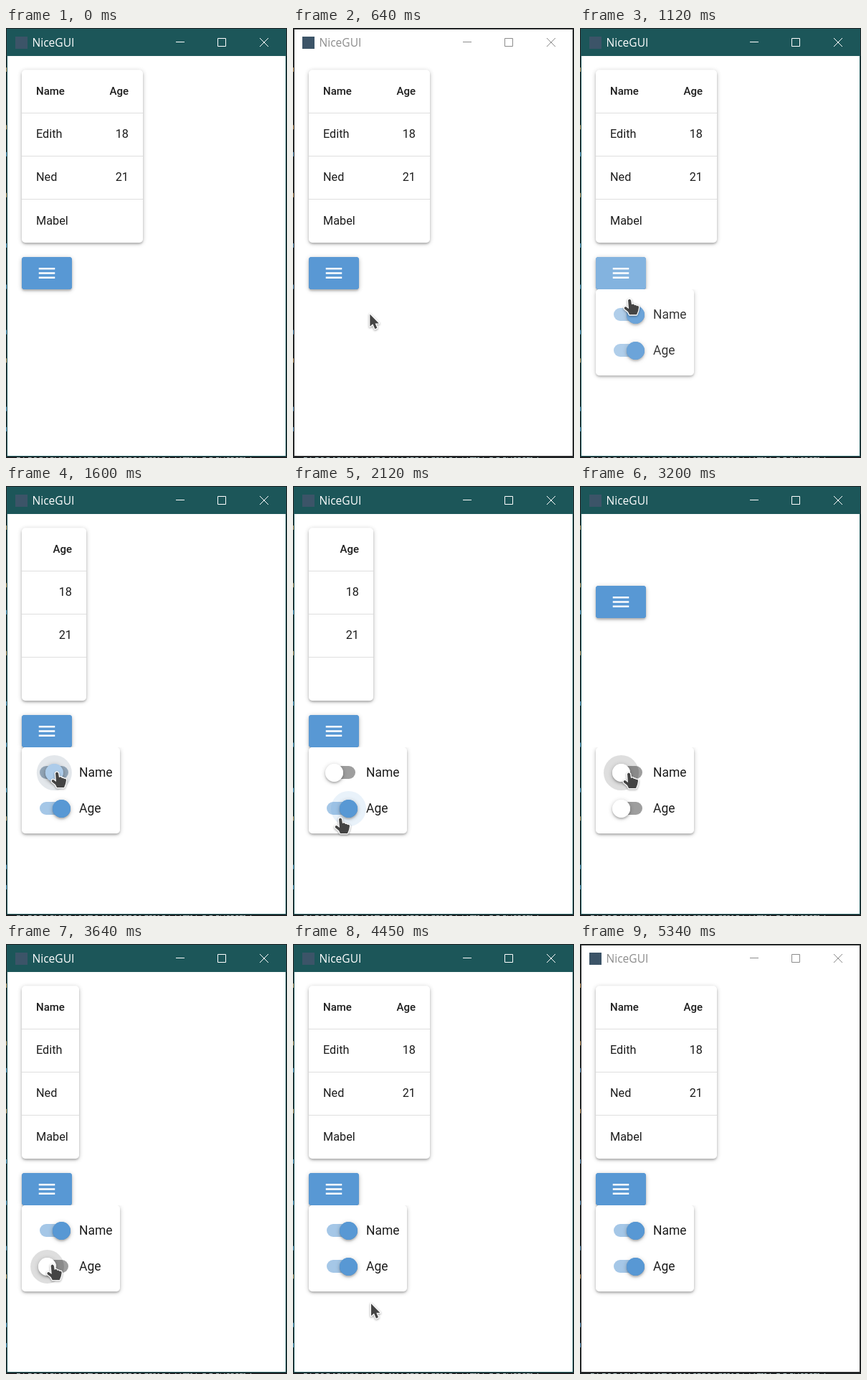
Recreate the animation shown at these times as an HTML page with a canvas. Size 392 by 599 pixels, loop 5420 ms.

```html
<!DOCTYPE html>
<html lang="en">
<head>
<meta charset="utf-8">
<title>Table columns</title>
<style>
  html, body { margin: 0; width: 100%; height: 100%; overflow: hidden; background: #fff; }
  canvas { display: block; }
</style>
</head>
<body>
<canvas id="stage" width="392" height="599"></canvas>
<script>
const ctx = document.getElementById('stage').getContext('2d');
const LOOP = 5420;
const INK = '#1d1d1d', BLUE = [88, 152, 212];
const REPLY = 60; // delay between a toggle and the table update
const rows = [['Name', 'Age'], ['Edith', '18'], ['Ned', '21'], ['Mabel', '']];

// Each move eases the pointer to a place between two times.
const pointerStart = { x: 262, y: 600 };
const moves = [
  { from: 120, to: 860, x: 66, y: 345 },
  { from: 880, to: 1300, x: 71, y: 398 },
  { from: 1880, to: 2120, x: 66, y: 462 },
  { from: 2400, to: 2720, x: 65, y: 443 },
  { from: 2760, to: 3000, x: 68, y: 399 },
  { from: 3480, to: 3700, x: 64, y: 456 },
  { from: 4240, to: 4450, x: 109, y: 501 },
  { from: 4450, to: 4770, x: 334, y: 600 }
];
const toggles = [
  { label: 'Name', y: 399, off: 1500, on: 3220, hovers: [[1240, 1900], [2900, 3440]] },
  { label: 'Age', y: 449, off: 2560, on: 4130, hovers: [[1940, 2800], [3510, 4250]] }
];

const handShape = new Path2D('M-2 2Q0-1 2 2L3 8Q6 6 7 9Q9 8 10 10Q13 9 13 12L12 17L10 22H0L-2 18L-7 14Q-8 11-5 11L-1 14Z');
const arrowShape = new Path2D('M0 0V17L4 13.5L7 20.5L10 19L7.3 12.7H12.5Z');

function ease(t, start, duration) {
  const k = Math.min(1, Math.max(0, (t - start) / duration));
  return k * k * (3 - 2 * k);
}
function randomizer(seed) {
  return () => (seed = seed * 16807 % 2147483647) / 2147483647;
}
function rect(x, y, w, h, color) {
  ctx.fillStyle = color;
  ctx.fillRect(x, y, w, h);
}
function pill(x, y, w, h, r, color) {
  ctx.fillStyle = color;
  ctx.beginPath();
  ctx.roundRect(x, y, w, h, r);
  ctx.fill();
}
function shadow(color, blur, dy) {
  ctx.shadowColor = color;
  ctx.shadowBlur = blur;
  ctx.shadowOffsetY = dy;
}
function raised(x, y, w, h, r, color) {
  shadow('rgba(0,0,0,.24)', 6, 1.25);
  pill(x, y, w, h, r, color);
  shadow('rgba(0,0,0,.18)', 2.5, 2.2);
  pill(x, y, w, h, r, color);
  shadow('transparent', 0, 0);
}
function text(string, x, y, font, color = INK, align = 'left') {
  ctx.font = font;
  ctx.fillStyle = color;
  ctx.textAlign = align;
  ctx.fillText(string, x, y);
}

// Slivers of the editor that show around the window
function drawBackdrop() {
  const random = randomizer(7);
  rect(0, 0, 392, 599, '#1f2224');
  for (let y = 55; y < 590; y += 25 + 60 * random()) {
    rect(0, y, 1, 6, `hsl(${random() < .5 ? 33 : 205} 50% 60%)`);
  }
  for (let x = 15; x < 345; x += 4 + 6 * random()) {
    rect(x, 598, 1 + 4 * random(), 1, '#a9bcbd');
  }
}

function drawWindow(focused) {
  const color = focused ? '#fff' : '#8c8c8c';
  rect(1, 1, 390, 596, focused ? '#1c5659' : '#2b2d2e');
  rect(2, 2, 388, 594, '#fff');
  if (focused) rect(2, 2, 388, 37, '#1c5659');
  rect(13, 12, 17, 17, '#3c5468');
  text('NiceGUI', 36.5, 26, '15.6px "Open Sans", "Noto Sans", sans-serif', color);
  ctx.strokeStyle = color;
  ctx.lineWidth = 1;
  ctx.beginPath();
  ctx.moveTo(237, 19.5); ctx.lineTo(249, 19.5);
  ctx.rect(295.5, 14.5, 11, 11);
  ctx.moveTo(354, 14); ctx.lineTo(366, 26);
  ctx.moveTo(366, 14); ctx.lineTo(354, 26);
  ctx.stroke();
}

function drawTable(name, age) {
  if (!name && !age) return;
  const width = name && age ? 169 : name ? 80 : 90;
  raised(22, 58.5, width, 240.5, 5, '#fff');
  rows.forEach(([person, years], i) => {
    const font = (i ? '16.25px' : '500 15px') + ' Roboto, sans-serif';
    const y = Math.round(92.9 + i * 60.2);
    if (name) text(person, 42, y, font);
    if (age) text(years, 2 + width, y, font, INK, 'right');
    if (i) rect(22, 58 + i * 60, width, 1, '#dfdfdf');
  });
}

function drawButton(y, t) {
  const glow = .15 * ease(t, 620, 200) + .11 * ease(t, 900, 180) - .26 * ease(t, 1120, 280);
  raised(22, y, 70, 45, 4, `rgb(${BLUE})`);
  pill(22, y, 70, 45, 4, `rgba(255,255,255,${glow})`);
  for (let i = 0; i < 3; i++) rect(45.75, y + 15 + 6.25 * i, 22.5, 2.5, '#fff');
}

function drawToggle({ label, y, off, on, hovers }, t) {
  const value = 1 - ease(t, off, 200) + ease(t, on, 200);
  const mix = (gray, color) => color.map(c => Math.round(gray + (c - gray) * value));
  const x = 57.5 + 20 * value;
  pill(47, y - 9, 40, 18, 9, `rgb(${mix(158, [165, 199, 231])})`);
  for (const [enter, leave] of hovers) {
    const r = 24.5 * (ease(t, enter, 150) - ease(t, leave, 150));
    pill(x - r, y - r + .5, 2 * r, 2 * r, r, `rgba(${mix(0, BLUE)},.13)`);
  }
  raised(x - 12.5, y - 12, 25, 25, 12.5, `rgb(${mix(255, BLUE)})`);
  text(label, 102, y + 6, '17.5px Roboto, sans-serif');
}

function drawMenu(t) {
  const opacity = ease(t, 870, 320);
  if (!opacity) return;
  ctx.save();
  ctx.beginPath();
  ctx.rect(14, 364, 154, 132);
  ctx.clip();
  raised(22, 364, 137, 120, 5, '#fff');
  for (const toggle of toggles) drawToggle(toggle, t);
  rect(14, 364, 154, 132, `rgba(255,255,255,${1 - opacity})`);
  ctx.restore();
}

function drawPointer(t) {
  if (t < 120 || t > 4770) return;
  const { x, y } = moves.reduce((at, move) => {
    const k = ease(t, move.from, move.to - move.from);
    return { x: at.x + (move.x - at.x) * k, y: at.y + (move.y - at.y) * k };
  }, pointerStart);
  const shape = t > 660 && t < 4330 ? handShape : arrowShape;
  ctx.save();
  ctx.translate(x, y);
  ctx.lineJoin = 'round';
  ctx.lineWidth = 2.6;
  ctx.strokeStyle = '#fff';
  shadow('rgba(0,0,0,.4)', 3, 1);
  ctx.stroke(shape);
  shadow('transparent', 0, 0);
  ctx.fillStyle = '#444';
  ctx.fill(shape);
  ctx.restore();
}

function draw(t) {
  const [name, age] = toggles.map(({ off, on }) => t < off + REPLY || t >= on + REPLY);
  const focused = t < 120 || (t >= 860 && t < 5340);
  drawBackdrop();
  drawWindow(focused);
  drawTable(name, age);
  drawButton(name || age ? 319 : 139, t);
  drawMenu(t);
  drawPointer(t);
}

const start = performance.now();
function tick() {
  draw((performance.now() - start) % LOOP);
  requestAnimationFrame(tick);
}
tick();
</script>
</body>
</html>
```
